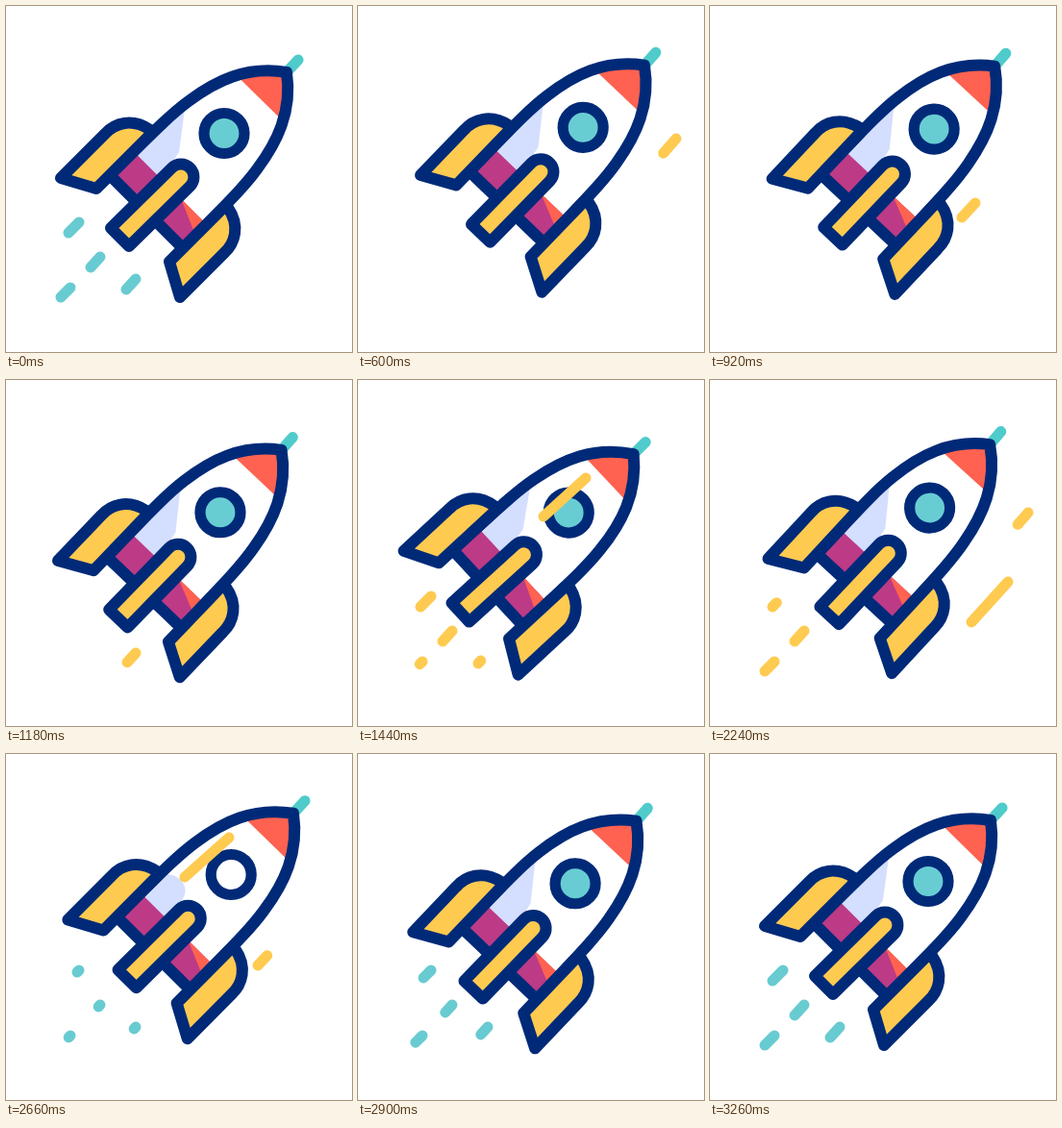
An HTML page for the animation above (3.52 s loop, 360 by 360 pixels).

```html
<!DOCTYPE html>
<html lang="en">
<head>
<meta charset="utf-8">
<title>Rocket</title>
<style>
  html, body { margin: 0; width: 100%; height: 100%; overflow: hidden; background: #fff; }
  svg { display: block; width: 100vw; height: 100vh; }
  .ink { stroke: #002a78; stroke-width: 12; stroke-linejoin: round; stroke-linecap: round; }
  .gold { fill: #ffca50; }
  .coral { fill: #ff6250; }
  .plum { fill: #bd3a86; }
  .lilac { fill: #d4deff; }
  #glass { stroke-width: 11.2; }
  #streaks line { stroke-width: 11; stroke-linecap: round; }
</style>
</head>
<body>
<svg viewBox="0 0 360 360">
  <defs>
    <path id="hull" d="M292 69C250 62 218 78 190 99C175 110 163 121 108 176L184 252C239 197 250 185 261 170C282 142 298 110 292 69Z"/>
    <clipPath id="inside"><use href="#hull"/></clipPath>
    <path id="fin" class="ink gold" d="M57 179L103 133C113 122 131 116 150 129V134L94 190Z"/>
  </defs>
  <g id="rocket">
    <path d="M292 69L304 56" stroke="#4fcbcb" stroke-width="11.2" stroke-linecap="round"/>
    <use href="#hull" fill="#fff"/>
    <g clip-path="url(#inside)">
      <path class="coral" d="M236 68.5L300 55L294 125.5Z"/>
      <path id="shade" class="lilac"/>
      <path class="plum" d="M126 144.5L216 234.5L184 262L98 176Z"/>
      <path class="coral" d="M182 200.5L216 234.5L197 238Z"/>
    </g>
    <use href="#hull" class="ink" fill="none"/>
    <use href="#fin"/>
    <use href="#fin" transform="matrix(0 -1 -1 0 360 360)"/>
    <path class="ink gold" d="M109 231L172.5 168.5A13.4 13.4 0 0 1 191.5 187.5L128 250Z"/>
    <circle id="glass" class="ink" cx="227" cy="132.5" r="21"/>
  </g>
  <g id="streaks"></g>
</svg>
<script>
const LOOP = 3520, START = 320, SWING = 340;
const TEAL = '#68cbd1', GOLD = '#ffca50';
const get = id => document.getElementById(id);
const clamp = v => Math.max(0, Math.min(1, v));
const ramp = (t, from, to) => clamp((t - from) / (to - from));
const smooth = v => v * v * (3 - 2 * v);

// Upper end, lower end, start times of each gold pass.
const tails = [
  { line: [76, 225, 65, 236], starts: [1220, 1850] },
  { line: [98, 261, 88, 272], starts: [1210, 2030] },
  { line: [67, 293, 57, 303], starts: [1395, 2000] },
  { line: [135, 284, 125, 295], starts: [1030, 1630] }
];
const gusts = [
  { line: [237, 102, 193, 142], starts: [1220] },
  { line: [270, 106, 246, 130], starts: [1450] },
  { line: [232, 87, 186, 128], starts: [2430] },
  { line: [310, 210, 272, 252], starts: [2020] },
  { line: [331, 138, 317, 154], starts: [440, 2110] },
  { line: [276, 205, 262, 220], starts: [690, 2320] }
];
const streaks = [...tails, ...gusts];
for (const s of streaks) {
  s.el = document.createElementNS('http://www.w3.org/2000/svg', 'line');
  get('streaks').append(s.el);
}

// Shows the part of a streak between fractions a and b.
function trim({ el, line: [x1, y1, x2, y2] }, a, b, color) {
  const mix = (p, q, v) => p + (q - p) * v;
  el.style.display = b > a ? '' : 'none';
  el.setAttribute('stroke', color);
  el.setAttribute('x1', mix(x1, x2, a));
  el.setAttribute('y1', mix(y1, y2, a));
  el.setAttribute('x2', mix(x1, x2, b));
  el.setAttribute('y2', mix(y1, y2, b));
}

function pass(s, t) {
  const start = s.starts.find(v => t >= v && t < v + 455);
  const age = start === undefined ? 0 : t - start;
  trim(s, ramp(age, 290, 455), ramp(age, 0, 170), GOLD);
}

function drawTail(s, t, i) {
  if (t < 700) trim(s, ramp(t, START + i * 30, START + 170 + i * 30), 1, TEAL);
  else if (t >= 2600) trim(s, 0, 1 - (1 - ramp(t, 2600, 3240)) ** 2, TEAL);
  else pass(s, t);
}

function drawRocket(t) {
  const age = t - START;
  const power = smooth(ramp(age, 0, 90)) * (1 - smooth(ramp(age, 2530, 2680)));
  const u = ((age - 45) / SWING + 0.5) * 2 * Math.PI;
  const shift = (7.4 * Math.sin(u) - 0.3) * power;
  const tilt = (0.4 - 2.6 * Math.cos(u - 0.25)) * power;
  get('rocket').setAttribute('transform',
    `translate(${shift} ${-shift}) rotate(${tilt} 255 104)`);

  const glint = t >= 2630 && t < 2690;
  get('glass').setAttribute('fill', glint ? '#fff' : '#68cdd3');
  get('shade').setAttribute('d', glint
    ? 'M125 155L150 133Q164 129 174 137Q184 148 175 160L160 182Z'
    : 'M125 155L188 92L180 152L160 182Z');
}

function frame(now) {
  const t = now % LOOP;
  drawRocket(t);
  tails.forEach((s, i) => drawTail(s, t, i));
  gusts.forEach(s => pass(s, t));
  requestAnimationFrame(frame);
}
frame(0);
</script>
</body>
</html>
```
